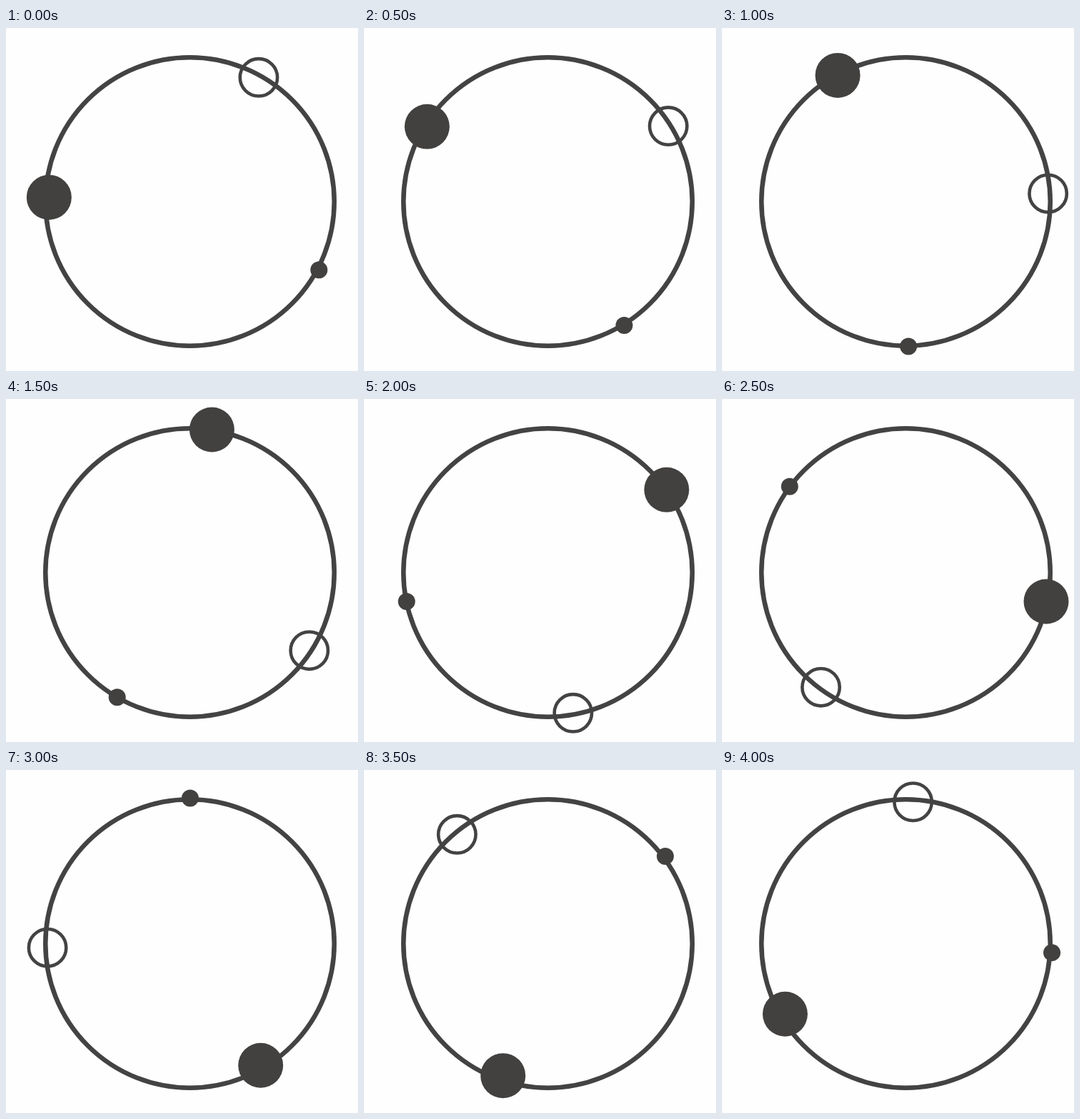
Write an HTML page with a canvas that moves like this. It is 493 px wide and 481 px high and loops after 4500 ms.

```html
<!DOCTYPE html>
<html lang="en">
<head>
<meta charset="utf-8">
<title>Orbiting circles</title>
<style>
  html, body { margin: 0; width: 100%; height: 100%; overflow: hidden; background: #fefefe; }
  canvas { display: block; }
</style>
</head>
<body>
<canvas id="stage" width="493" height="481"></canvas>
<script>
const ctx = document.getElementById('stage').getContext('2d');
const STEP = 500;
const STEPS = 9;
const LINE = '#444343';
const FILL = '#42413f';

// Each body circles its own centre; angles in degrees at the key steps.
const KEY_STEPS = [0, 2, 3, 5, 7, 8];
const large = { x: 259.6, y: 240.2, orbit: 199.3, angles: [180.8, 240.7, 278.3, 372.7, 469, 509.2] };
const hollow = { x: 257.5, y: 244, orbit: 199.5, angles: [-61.1, -3.4, 33, 126.6, 230.4, 272.9] };
const small = { x: 259, y: 243, orbit: 203.5, angles: [28.2, 89.4, 120.5, 216.2, 323.2, 363.7] };

function angleAt(angles, step) {
  const next = KEY_STEPS.findIndex(key => key >= step);
  if (KEY_STEPS[next] === step) return angles[next];
  const from = KEY_STEPS[next - 1];
  const part = (step - from) / (KEY_STEPS[next] - from);
  return angles[next - 1] + (angles[next] - angles[next - 1]) * part;
}

function place({ x, y, orbit, angles }, step) {
  const a = angleAt(angles, step) * Math.PI / 180;
  return [x + orbit * Math.cos(a), y + orbit * Math.sin(a)];
}

function circle([x, y], r) {
  ctx.beginPath();
  ctx.arc(x, y, r, 0, Math.PI * 2);
}

// The radius runs to the outer edge of the line.
function ring(centre, outer, width) {
  circle(centre, outer - width / 2);
  ctx.lineWidth = width;
  ctx.strokeStyle = LINE;
  ctx.stroke();
}

function disc(centre, r) {
  circle(centre, r);
  ctx.fillStyle = FILL;
  ctx.fill();
}

function draw(time) {
  const step = Math.floor(time / STEP) % STEPS;
  ctx.fillStyle = '#fefefe';
  ctx.fillRect(0, 0, 493, 481);
  ring([257.5, 243.5], 205.5, 6.5);
  ring(place(hollow, step), 28.5, 4.6);
  disc(place(large, step), 31.5);
  disc(place(small, step), 12);
}

const start = performance.now();
function tick() {
  draw(performance.now() - start);
  requestAnimationFrame(tick);
}
tick();
</script>
</body>
</html>
```
